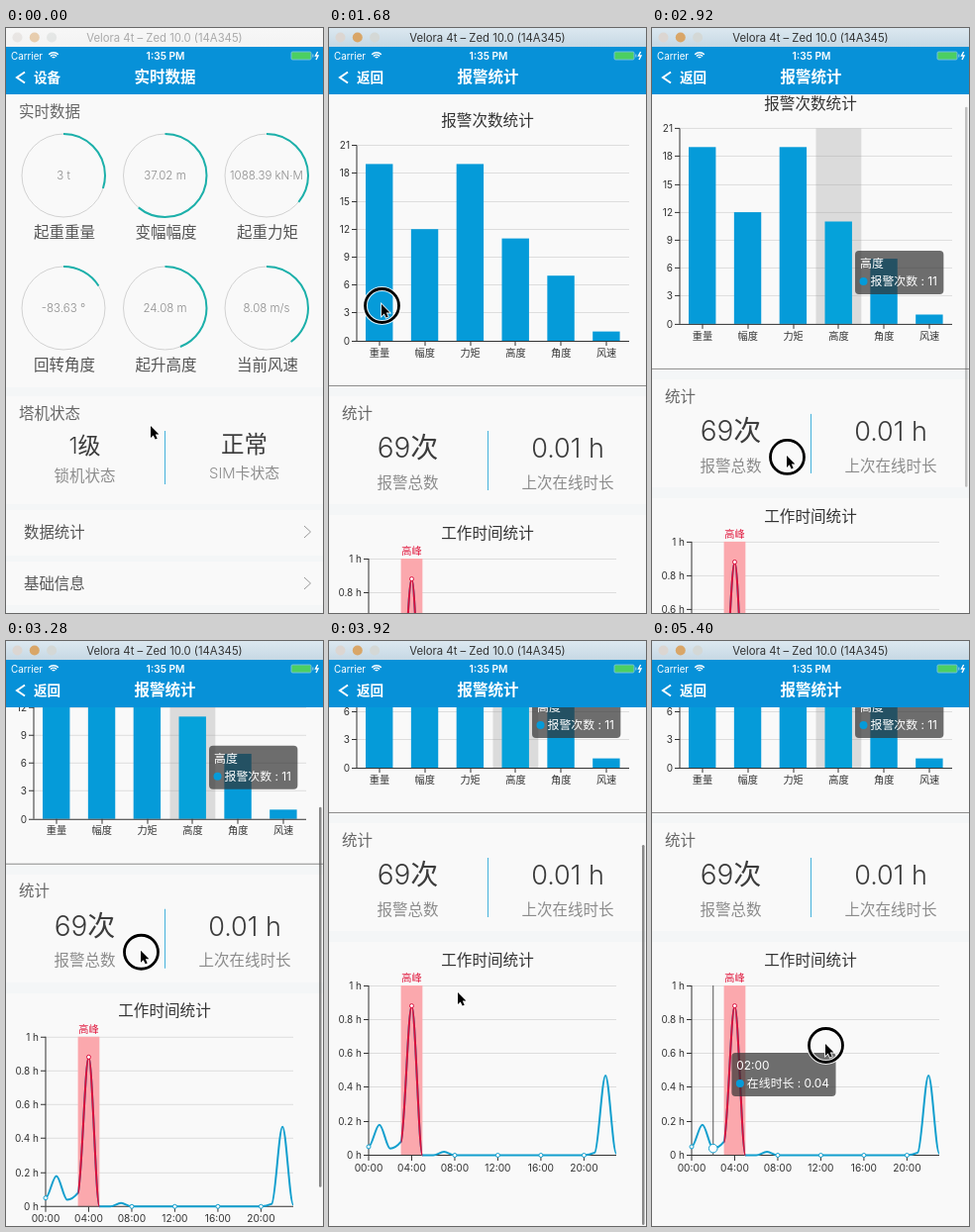
These frames come from a looping animation (320x591 px, 5440 ms). An HTML page with a canvas:

```html
<!DOCTYPE html>
<html lang="zh">
<head>
<meta charset="utf-8">
<style>
html, body { margin: 0; width: 100%; height: 100%; overflow: hidden; background: #f9f9f9; }
canvas { display: block; width: 320px; height: 591px; }
</style>
</head>
<body>
<canvas id="stage"></canvas>
<script>
const W = 320, H = 591, LOOP = 5440, TOP = 67;
const CJK = '"Noto Sans CJK SC", "Noto Sans CJK", sans-serif';
const BLUE = '#059bd9', LINE = '#129fce', RED = '#dc0f3b';
const INK = '#333', DIM = '#555', GREY = '#8c8c8c';
const canvas = document.getElementById('stage');
const c = canvas.getContext('2d');
const dpr = window.devicePixelRatio || 1;
canvas.width = W * dpr;
canvas.height = H * dpr;

const clamp = p => Math.max(0, Math.min(1, p));
const mix = (a, b, p) => a + (b - a) * p;
const easeOut = (p, n) => 1 - (1 - clamp(p)) ** n;
const easeInOut = p => clamp(p) ** 2 * (3 - 2 * clamp(p));

function setFont(size, weight = 400) {
  const light = weight < 400 ? '"Noto Sans CJK SC Light", ' : '';
  c.font = `${weight} ${size}px Inter, ${light}${CJK}`;
}
function text(s, x, y, size, color = INK, align = 'center', weight = 400) {
  setFont(size, weight);
  c.fillStyle = color;
  c.textAlign = align;
  c.fillText(s, x, y + size * 0.365);
}
function rect(x, y, w, h, color) {
  c.fillStyle = color;
  c.fillRect(x, y, w, h);
}
function roundRect(x, y, w, h, r, color) {
  c.beginPath();
  c.roundRect(x, y, w, h, r);
  c.fillStyle = color;
  c.fill();
}
function path(points, color, width = 1) {
  c.beginPath();
  points.forEach(([x, y]) => c.lineTo(x, y));
  c.strokeStyle = color;
  c.lineWidth = width;
  c.stroke();
}
function circle(x, y, r, stroke, width, fill, from = 0, to = 1) {
  c.beginPath();
  c.arc(x, y, r, (from - 0.25) * 2 * Math.PI, (to - 0.25) * 2 * Math.PI);
  if (fill) { c.fillStyle = fill; c.fill(); }
  if (stroke) { c.strokeStyle = stroke; c.lineWidth = width; c.stroke(); }
}
function gradient(y, h, from, to) {
  const g = c.createLinearGradient(0, y, 0, y + h);
  g.addColorStop(0, from);
  g.addColorStop(1, to);
  rect(0, y, W, h, g);
}

// Pointer stops: press time, release time, x, y
const START = { down: 0, up: 0, x: 146, y: 402 };
const stop = (down, up, x, y) => ({ down, up, x, y });
const ROW = stop(200, 640, 138, 496);
const BAR_TAPS = [stop(1640, 1760, 53, 279), stop(2080, 2160, 147, 294), stop(2430, 2500, 185, 304)];
const DRAG = stop(2850, 3380, 136, 449);
const REST = stop(3900, 3900, 130, 355);
const LINE_TAPS = [stop(4440, 4520, 173, 478), stop(4800, 4880, 83, 478), stop(5070, 5150, 60, 478)];
const LAST = stop(5360, LOOP, 175, 407);
const STOPS = [START, ROW, ...BAR_TAPS, DRAG, REST, ...LINE_TAPS, LAST];

const MAX_SCROLL = 188;
const scrollAt = t => MAX_SCROLL * easeOut((t - 2880) / 760, 1.72);
// Where a stop leaves the pointer: the drag carries it along with the page
const stopY = (s, t) => s === DRAG ? s.y - scrollAt(Math.min(t, s.up)) : s.y;

function mouse(t) {
  const n = Math.max(0, STOPS.findLastIndex(s => s.up <= t));
  const a = STOPS[n], b = STOPS[n + 1];
  const leave = Math.max(a.up, b.down - 420);
  const p = easeInOut((t - leave) / (b.down - leave));
  const x = mix(a.x, b.x, p), y = mix(stopY(a, t), stopY(b, t), p);
  if (t >= b.down) {
    circle(x + 0.5, y + 1.5, 17, 'rgba(255,255,255,.85)', 5);
    circle(x + 0.5, y + 1.5, 17, '#000', 2.8);
  }
  c.beginPath();
  [[0, 0], [0, 12], [2.7, 9.4], [4.7, 13.6], [6.7, 12.7], [4.8, 8.6], [8.4, 8.6]]
    .forEach(([dx, dy]) => c.lineTo(x + dx, y + dy));
  c.closePath();
  c.strokeStyle = '#fff';
  c.lineWidth = 1.6;
  c.stroke();
  c.fillStyle = '#000';
  c.fill();
}

function header(title, back) {
  rect(0, 19, W, TOP - 19, '#0791d8');
  path([[19, 44.5], [11, 50], [19, 55.5]], '#fff', 2);
  text(back, 28, 50, 13.6, '#fff', 'left', 700);
  text(title, 160.5, 49, 15.5, '#fff', 'center', 700);
}
function stat(value, label, x, y, size, labelY, labelSize = 15.5) {
  text(value, x, y, size, '#3c3c3c', 'center', 300);
  text(label, x, labelY, labelSize, GREY, 'center', 300);
}
const heading = (s, y) => text(s, 13, y, 15.5, '#666', 'left', 300);
const band = (y, h) => rect(0, y, W, h, '#f4f6f7');

const GAUGES = [
  ['3 t', '起重重量', 0.30], ['37.02 m', '变幅幅度', 0.61], ['1088.39 kN·M', '起重力矩', 0.36],
  ['-83.63 °', '回转角度', 0.16], ['24.08 m', '起升高度', 0.44], ['8.08 m/s', '当前风速', 0.40],
];
function livePage(t) {
  rect(0, TOP, W, H, '#f9f9f9');
  heading('实时数据', 84);
  GAUGES.forEach(([value, label, part], i) => {
    const x = 58 + i % 3 * 102.5, y = 149 + Math.floor(i / 3) * 134;
    circle(x, y, 42, '#d2d2d2', 1);
    circle(x, y, 42, '#1cb0aa', 2, null, 0, part);
    text(value, x, y, 11.5, GREY, 'center', 300);
    text(label, x + 1, y + 57, 15.5, DIM, 'center', 300);
  });
  band(363, 9);
  heading('塔机状态', 389);
  stat('1级', '锁机状态', 79.5, 422, 23, 452);
  stat('正常', 'SIM卡状态', 240.5, 420, 23.5, 450, 14.8);
  rect(160, 407, 1, 54, '#45b2dc');
  ['数据统计', '基础信息'].forEach((label, i) => {
    const y = 509 + i * 52;
    band(y - 28, 6);
    c.globalAlpha = i === 0 && t >= ROW.down ? 0.2 : 1;
    text(label, 18, y, 15.4, DIM, 'left', 300);
    path([[301, y - 6], [307.5, y], [301, y + 6]], '#999', 1);
    c.globalAlpha = 1;
  });
  band(583, 8);
  header('实时数据', '设备');
}

// Selected index, moving pointer index and tooltip place after the latest tap
function hover(taps, indexOf, offset, t) {
  const n = taps.findLastIndex(s => s.up <= t);
  if (n < 0) return null;
  const now = taps[n], was = taps[Math.max(0, n - 1)], age = t - now.up;
  const slow = easeOut(age / 400, 4.2);
  return {
    i: indexOf(now.x),
    pointer: mix(indexOf(was.x), indexOf(now.x), easeOut(age / 200, 4)),
    x: mix(was.x, now.x, slow) + 20,
    y: mix(was.y, now.y, slow) - 62 + offset,
  };
}
function tooltip({ x, y }, title, line) {
  const size = 11.9;
  setFont(size);
  roundRect(x, y, 22 + c.measureText(line).width, 44, 4, 'rgba(50,50,50,.7)');
  text(title, x + 5, y + 13, size, '#fff', 'left');
  circle(x + 8.5, y + 31, 4, null, 0, BLUE);
  text(line, x + 15.5, y + 31, size, '#fff', 'left');
}

const BARS = [['重量', 19], ['幅度', 12], ['力矩', 19], ['高度', 11], ['角度', 7], ['风速', 1]];
function barChart(t, appear) {
  const x0 = 28, x1 = 303, y0 = 316, unit = 9.4, step = (x1 - x0) / BARS.length;
  const h = hover(BAR_TAPS, x => Math.floor((x - x0) / step), 0, t);
  for (let v = 0; v <= 21; v += 3) {
    const y = Math.floor(y0 - v * unit);
    if (v) rect(x0, y, x1 - x0, 1, '#ddd');
    rect(x0 - 5, y, 5, 1, INK);
    text(v, x0 - 7, y + 0.5, 10, INK, 'right');
  }
  if (h) rect(x0 + h.pointer * step, y0 - 21 * unit, step, 21 * unit, 'rgba(150,150,150,.3)');
  BARS.forEach(([name, v], i) => {
    const x = x0 + (i + 0.5) * step, size = v * unit * easeOut(appear, 3);
    rect(x - 13.9, y0 - size, 27.4, size, h && h.i === i ? '#05a2da' : BLUE);
    rect(Math.round(x) - 0.5, y0, 1, 5, INK);
    text(name, x, 328, 10.2);
  });
  rect(x0 - 0.5, y0 - 21 * unit, 1, 21 * unit, INK);
  rect(x0, y0, x1 - x0, 1, INK);
  if (h) tooltip(h, BARS[h.i][0], `报警次数 : ${BARS[h.i][1]}`);
}

const HOURS = Array(24).fill(0);
Object.assign(HOURS, { 0: 0.05, 1: 0.18, 2: 0.04, 3: 0.08, 4: 0.88, 7: 0.02, 21: 0.015, 22: 0.47, 23: 0.01 });
const HOUR = 250 / 23;
const hourX = i => 40 + i * HOUR;
const hourY = v => 707.5 - v * 171.5;
const hourName = i => String(i).padStart(2, '0') + ':00';

// Smooth curve that never overshoots its points
function curve(color) {
  const slope = HOURS.map((v, i) => (HOURS[i + 1] ?? v) - v);
  const tangent = slope.map((b, i) => {
    const a = slope[i - 1] ?? 0;
    return a * b > 0 ? 2 * a * b / (a + b) : 0;
  });
  c.beginPath();
  c.moveTo(hourX(0), hourY(HOURS[0]));
  for (let i = 0; i < 23; i++) {
    c.bezierCurveTo(
      hourX(i + 1 / 3), hourY(HOURS[i] + tangent[i] / 3),
      hourX(i + 2 / 3), hourY(HOURS[i + 1] - tangent[i + 1] / 3),
      hourX(i + 1), hourY(HOURS[i + 1]));
  }
  c.strokeStyle = color;
  c.lineWidth = 2;
  c.stroke();
}
function clipped(x0, x1, draw) {
  c.save();
  c.beginPath();
  c.rect(x0, 520, x1 - x0, 200);
  c.clip();
  draw();
  c.restore();
}
function lineChart(t, appear) {
  const h = hover(LINE_TAPS, x => Math.round((x - 40) / HOUR), MAX_SCROLL, t);
  const from = hourX(3), to = hourX(5);
  for (let k = 0; k <= 5; k++) {
    const y = Math.round(hourY(k / 5) - 0.5);
    if (k) rect(40, y, 250, 1, '#ddd');
    rect(35, y, 5, 1, INK);
    text(`${k / 5} h`, 33, y + 0.5, 10, INK, 'right');
  }
  rect(from, hourY(1), to - from, 171.5, '#fba8ad');
  text('高峰', hourX(4), 528.5, 10.2, '#e0163c');
  rect(39.5, hourY(1), 1, 171.5, INK);
  rect(40, 707, 250, 1, INK);
  for (let i = 0; i < 24; i += 4) {
    rect(hourX(i) - 0.5, 708, 1, 5, INK);
    text(hourName(i), hourX(i), 720, 10.2);
  }
  if (h) rect(hourX(h.pointer) - 0.5, hourY(1), 1, 171.5, DIM);
  clipped(36, mix(38, 294, easeOut(appear, 2)), () => {
    curve(LINE);
    clipped(from, to, () => curve(RED));
    for (let i = 0; i < 24; i += 4)
      circle(hourX(i), hourY(HOURS[i]), 2, i === 4 ? RED : LINE, 1, '#fff');
  });
  if (h) {
    circle(hourX(h.i), hourY(HOURS[h.i]), 4.3, LINE, 1, '#fff');
    tooltip(h, hourName(h.i), `在线时长 : ${HOURS[h.i]}`);
  }
}

function spinner(x, y, t) {
  const head = Math.floor(t / 83);
  for (let i = 0; i < 12; i++) {
    const a = i * Math.PI / 6, age = (head + 12 - i) % 12;
    const at = r => [x + r * Math.sin(a), y - r * Math.cos(a)];
    path([at(4), at(8)], `rgba(110,110,110,${0.7 - age * 0.05})`);
  }
}

function statsPage(t) {
  const scroll = scrollAt(t), appear = (t - 1080) / 600;
  rect(0, TOP, W, H, '#f9f9f9');
  c.save();
  c.translate(0, -scroll);
  text('报警次数统计', 160, 93, 15.6);
  band(363, 9);
  band(481, 11);
  heading('统计', 389);
  stat('69次', '报警总数', 79.5, 424, 28, 459);
  stat('0.01 h', '上次在线时长', 241, 424, 27, 459);
  rect(160, 407, 1, 60, '#45b2dc');
  text('工作时间统计', 160, 510, 15.6);
  if (appear < 0) {
    spinner(160, 232, t);
  } else {
    rect(0, 361, W, 1, GREY);
    lineChart(t, appear);
    barChart(t, appear);
  }
  c.restore();

  const alpha = clamp((t - 2880) / 80) * clamp((4280 - t) / 240);
  roundRect(316, TOP + scroll * 0.739, 2.5, 384, 1.2, `rgba(90,90,90,${alpha * 0.7})`);
  header('报警统计', '返回');
}

function windowBar(active) {
  if (active) gradient(0, 19, '#dce8f0', '#c6d8e4');
  else gradient(0, 19, '#f7f7f7', '#f3f3f3');
  ['#dcd6d2', '#d9a668', '#d4d8d6'].forEach((color, i) => {
    c.globalAlpha = active ? 1 : 0.5;
    circle(11.5 + i * 17.3, 9.5, 5, null, 0, color);
  });
  c.globalAlpha = 1;
  text('Velora 4t – Zed 10.0 (14A345)', 160, 9.5, 11.3, active ? INK : '#aaa');
}
function statusBar() {
  text('Carrier', 5, 28, 9.8, '#fff', 'left');
  [2, 4.4, 6.8].forEach(r => circle(48, 31.5, r, '#fff', 1.4, null, -0.125, 0.125));
  text('1:35 PM', 161, 28, 10.2, '#fff', 'center', 600);
  roundRect(287.5, 23.5, 21, 9, 2, '#6fbfe0');
  rect(288.5, 24.5, 19, 7, '#4ccf62');
  rect(309, 26.5, 1.5, 3, '#6fbfe0');
  path([[314.6, 24], [312.5, 28], [315, 28], [313, 32]], '#fff', 1.4);
}

function frame() {
  const t = performance.now() % LOOP;
  const push = easeOut((t - ROW.up) / 526, 2.5);
  const slide = (x, page) => {
    c.save();
    c.translate(x, 0);
    page(t);
    c.restore();
  };
  c.setTransform(dpr, 0, 0, dpr, 0, 0);
  if (push < 1) slide(-0.3 * W * push, livePage);
  if (push > 0) slide(W * (1 - push), statsPage);
  windowBar(t >= 80);
  statusBar();
  mouse(t);
  requestAnimationFrame(frame);
}
requestAnimationFrame(frame);
</script>
</body>
</html>
```
